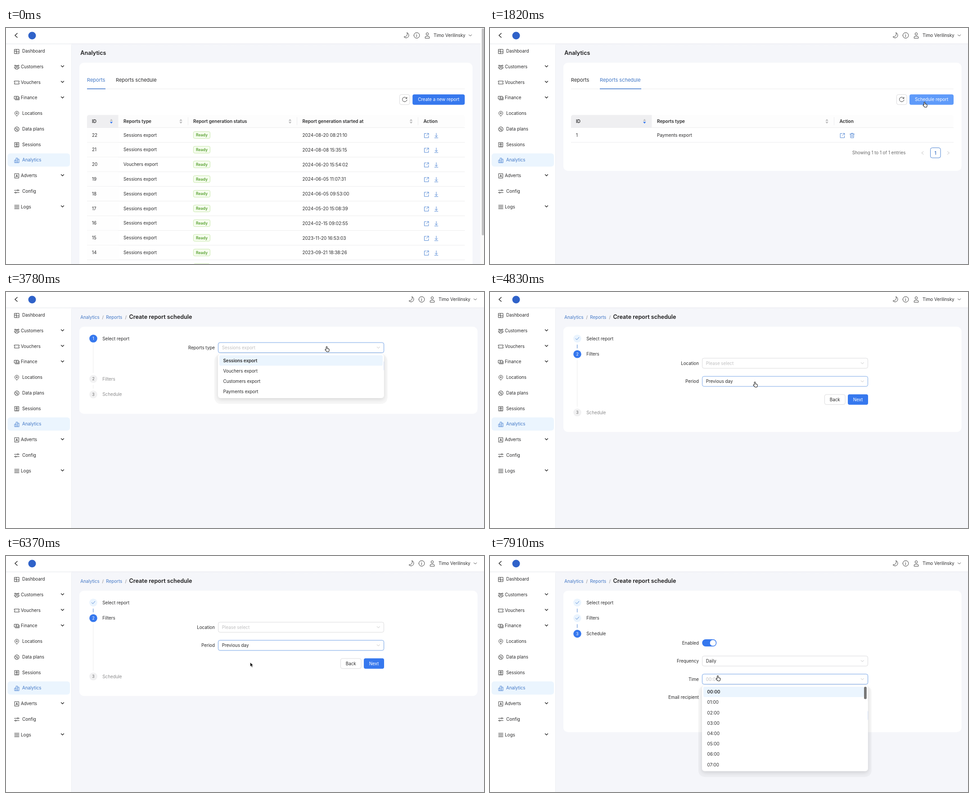
Animation of 1062x527 px, one loop 8 s. Source, as an HTML page:

```html
<!DOCTYPE html>
<html lang="en">
<head>
<meta charset="utf-8">
<title>Report schedule</title>
<style>
html, body { margin: 0; width: 100%; height: 100%; overflow: hidden; background: #f5f6fa; }
svg { display: block; width: 1062px; height: 527px; }
text { font: 9.8px Inter, "Noto Sans", sans-serif; fill: #2b2b2c; dominant-baseline: central; white-space: pre; }
.tab { font-size: 11px; }
.title { font-size: 12.6px; font-weight: 600; fill: #1c1c1d; }
.bold { font-weight: 600; }
.head { font-size: 10px; font-weight: 600; }
.date { font-size: 9.95px; }
.tag { font-size: 8.6px; font-weight: 600; fill: #57a02f; }
.num { font-size: 8.6px; text-anchor: middle; }
.end { text-anchor: end; }
.mid { text-anchor: middle; }
.blue { fill: #4177c6; }
.white { fill: #fff; }
.grey { fill: #8c8c8d; }
.pale { fill: #bfbfc0; }
.soft { fill: #666; }
.icon { fill: none; stroke: #333; stroke-width: .95; stroke-linejoin: round; stroke-linecap: round; }
.icon.link { stroke: #4a82d2; }
.icon.faint { stroke: #bdbdbe; }
.icon.dark { stroke: #222; stroke-width: 1.3; }
.line { stroke: #ececed; fill: none; }
.box { fill: #fff; stroke: #cdcdcf; stroke-width: .73; }
.primary { fill: #3678ee; }
.hover .primary { fill: #5f9bfa; }
.hover .box, .focus .box { stroke: #4a88dd; }
.hover .tab { fill: #4177c6; }
.ring { fill: none; stroke: #3678ee; stroke-opacity: 0; stroke-width: 1.5; }
.focus .ring { stroke-opacity: .06; }
.open .value { fill: #bfbfc0; }
.menu { transform-box: fill-box; transform-origin: 50% 0; }
.sheet { fill: #fff; filter: drop-shadow(0 3px 5px rgba(0,0,0,.13)); }
</style>
</head>
<body>
<svg id="stage" viewBox="0 0 1062 527"></svg>
<script>
const LOOP = 8000, STEP = 70;

const text = (x, y, s, cls = '') => `<text x="${x}" y="${y}" class="${cls}">${s}</text>`;
const rect = (x, y, w, h, r, attr) => `<rect x="${x}" y="${y}" width="${w}" height="${h}" rx="${r}" ${attr}/>`;
const fill = c => `fill="${c}"`;
const line = (x1, y1, x2, y2, attr = 'class="line"') => `<path d="M${x1} ${y1}L${x2} ${y2}" ${attr}/>`;
const icon = (x, y, d, cls = '') => `<path class="icon ${cls}" d="${d}" transform="translate(${x} ${y})"/>`;
const group = (id, body) => `<g id="${id}">${body}</g>`;
// Interactive area: carries its own hit box
const hot = (x, y, w, h, body, id = '') => `<g class="hot" id="${id}" data-box="${x},${y},${w},${h}">${body}</g>`;
const ring = (x, y, r) => `M${x - r} ${y}a${r} ${r} 0 1 0 ${2 * r} 0a${r} ${r} 0 1 0 ${-2 * r} 0`;

const ICONS = {
  dashboard: 'M-5-4.5h10v9.5h-10zM-1-4.5v9.5M-5-.5h4M-1 1h6',
  customers: ring(0, -2, 1.6) + ring(-3.6, -3, 1.3) + ring(3.6, -3, 1.3) + 'M-2.8 4.5v-1.5q0-2 2.8-2t2.8 2v1.5zM-3.2 2.5h-2.2v-1q0-1.8 2-1.8M3.2 2.5h2.2v-1q0-1.8-2-1.8',
  vouchers: 'M-5.3-3.3h10.6v2a1.4 1.4 0 0 0 0 2.8v2h-10.6v-2a1.4 1.4 0 0 0 0-2.8z',
  finance: 'M-5.3-4h9v6h-9zM-3.5 4h8.8v-6' + ring(-.8, -1, 1.5),
  locations: 'M0 5.3C-3 2.5-4.5 1-4.5-.8a4.5 4.5 0 0 1 9 0C4.5 1 3 2.5 0 5.3z' + ring(0, -.8, 1.5),
  plans: ring(0, 0, 5.2) + 'M-3.4 3.6l6.8-7' + ring(-1.8, -1.6, .9) + ring(1.8, 1.8, .9),
  sessions: 'M-4.5-5h9v10h-9zM-2.5 3.3h5' + ring(0, -1, 2.2) + ring(0, -1, .5),
  analytics: 'M-5 5v-5.5h3.3v5.5zM-1.7 5v-10h3.4v10zM1.7 5v-7.5h3.3v7.5z',
  adverts: 'M-4.5-5h9v10h-9zM-2 2.6l2-5.4l2 5.4M-1.3 1h2.6',
  config: 'M-5.3-2.5h6M4-2.5h1.3M-5.3 2.5h1.3M-1 2.5h6.3' + ring(2.4, -2.5, 1.5) + ring(-2.5, 2.5, 1.5),
  logs: 'M-5-4h10M-5-1.3h10M-5 1.4h10M-5 4h10',
  down: 'M-3-1.5l3 3l3-3',
  left: 'M2-3.2l-4 3.2l4 3.2',
  right: 'M-2-3.2l4 3.2l-4 3.2',
  check: 'M-3.6 0l2.5 2.7l4.8-5.4',
  moon: 'M1.6-6A6 6 0 1 1-5.3 3.2A6.6 6.6 0 0 0 1.6-6z',
  info: ring(0, 0, 6.3) + 'M0-.8v4M0-3v.2',
  user: ring(0, -3.2, 2.7) + 'M-4.8 6v-1.2q0-3 3-3h3.6q3 0 3 3v1.2z',
  reload: 'M4.6-2.8A5.2 5.2 0 1 0 5.2 .6M5-5.2v2.8h-2.8',
  open: 'M-.5-4.5h-4v9.5h9.3v-4M1.5-4.7h3.5v3.5M5-4.7l-4.8 4.8',
  download: 'M0-5v8M-2.7.4l2.7 2.8l2.7-2.8M-3.8 5.3h7.6',
  trash: 'M-5-3.2h10M-2-3.2v-1.8h4v1.8M-3.8-3.2l.5 8.4h6.6l.5-8.4M-1.2-.6v3.4M1.2-.6v3.4'
};

function sidebar() {
  const items = [['Dashboard', 'dashboard'], ['Customers', 'customers', 1], ['Vouchers', 'vouchers', 1],
    ['Finance', 'finance', 1], ['Locations', 'locations'], ['Data plans', 'plans'], ['Sessions', 'sessions'],
    ['Analytics', 'analytics'], ['Adverts', 'adverts', 1], ['Config', 'config'], ['Logs', 'logs', 1]];
  return rect(0, 34, 145, 493, 0, fill('#fff')) + line(145.5, 38, 145.5, 527, 'stroke="#eceef2"')
    + rect(3.5, 280, 138.5, 29.5, 6, fill('#ebf5fe'))
    + items.map(([label, name, nested], i) => {
      const y = 51.5 + 34.75 * i, active = name === 'analytics';
      return icon(24, y + .7, ICONS[name], active ? 'link' : '')
        + text(nested ? 33 : 36, y, label, active ? 'blue' : '')
        + (nested ? icon(125.5, y - .8, ICONS.down, 'dark') : '');
    }).join('');
}

function header() {
  const user = icon(900.5, 16.5, ICONS.moon) + icon(923.5, 16.5, ICONS.info) + icon(947, 16.5, ICONS.user)
    + text(961, 16.5, 'Timo Verilinsky') + icon(1042.5, 16.5, ICONS.down);
  return rect(0, 34, 1062, 4, 0, 'fill="url(#shade)"') + rect(0, 0, 1062, 34.5, 0, fill('#fff'))
    + '<path d="M25.5 11.5l-5.5 5l5.5 5" fill="none" stroke="#222" stroke-width="1.4"/>'
    + '<circle cx="58" cy="17" r="8.5" fill="#2f62c9"/>' + group('user', user);
}

const card = (right, bottom) => rect(163, 77.5, right - 163, bottom - 77.5, 10, fill('#fff'));
const sorter = (x, sorted) => `<path d="M${x - 3.2} 207.3l3.2-4l3.2 4z" fill="#b9b9ba"/>`
  + `<path d="M${x - 3.2} 209.5l3.2 4l3.2-4z" fill="${sorted ? '#3678ee' : '#b9b9ba'}"/>`;
const button = (x, y, w, label, primary) => hot(x, y, w, 23.2, primary
  ? rect(x, y, w, 23.2, 4, 'class="primary"') + text(x + w / 2, y + 11.6, label, 'white mid')
  : rect(x + .4, y + .4, w - .8, 22.4, 4, 'class="box"') + text(x + w / 2, y + 11.6, label, 'mid'));
const reload = x => hot(x, 148.2, 23.4, 23.2, rect(x + .4, 148.6, 22.6, 22.4, 4, 'class="box"')
  + icon(x + 11.7, 159.8, ICONS.reload));
const tabs = (active, right) => line(180, 136, right, 136)
  + hot(180, 104, 41, 32, text(180, 116.3, 'Reports', 'tab' + (active ? '' : ' blue')))
  + hot(244, 104, 92, 32, text(244, 116.3, 'Reports schedule', 'tab' + (active ? ' blue' : '')));

// Columns: [label, text x, sorter x, separator x]
function tableHead(idRight, right, columns) {
  return rect(180, 194.2, right - 180, 28, 5, fill('#fdfdfd'))
    + `<path d="M180 222.2v-23q0-5 5-5H${idRight}v28z" fill="#efeff1"/>`
    + columns.map(([label, x, sort, bar], i) => text(x, 208.3, label, 'head')
      + (sort ? sorter(sort, !i) : '') + (bar ? line(bar, 199, bar, 217) : '')).join('')
    + line(180, 222.4, right, 222.4);
}

function reportsPage() {
  const dates = ['2024-08-20 08:21:10', '2024-08-08 15:35:15', '2024-06-20 15:54:02', '2024-06-05 11:07:31',
    '2024-06-05 09:53:00', '2024-05-20 15:08:39', '2024-02-15 09:02:55', '2023-11-20 16:53:03',
    '2023-09-21 18:38:26', '2023-09-14 10:12:41'];
  const rows = dates.map((date, i) => {
    const y = 239 + 32.8 * i;
    return rect(180, y - 16, 69.5, 32, 0, fill('#fefefe'))
      + text(191, y, 22 - i) + text(261, y, i === 2 ? 'Vouchers export' : 'Sessions export')
      + rect(416.4, y - 7.6, 37, 15.2, 3, 'fill="#f6fdef" stroke="#b5e08f" stroke-width=".73"')
      + text(435, y + .2, 'Ready', 'tag mid') + text(658.5, y, date, 'date')
      + icon(934, y + 1, ICONS.open, 'link') + icon(956, y + 1, ICONS.download, 'link')
      + line(180, y + 16.4, 1019.5, y + 16.4);
  }).join('');
  return text(165.3, 55.7, 'Analytics', 'title') + card(1036.5, 560) + tabs(0, 1019.5)
    + reload(874) + button(903.2, 148.2, 116, 'Create a new report', true)
    + tableHead(249.5, 1019.5, [['ID', 191, 234], ['Reports type', 261, 388.5, 404.5],
      ['Report generation status', 416, 631, 646.5], ['Report generation started at', 658.5, 900, 915.5],
      ['Action', 927.5]])
    + rows + rect(1054, 0, 8, 527, 0, fill('#fafafa')) + rect(1057, 1, 5, 462, 2.5, fill('#c1c1c3'));
}

function schedulePage() {
  return text(165.3, 55.7, 'Analytics', 'title') + card(1047.5, 319) + tabs(1, 1030)
    + reload(903) + button(932, 148.2, 98, 'Schedule report', true)
    + tableHead(359.5, 1030, [['ID', 191, 343.3], ['Reports type', 371, 748.5, 764.5], ['Action', 776.5]])
    + text(191, 239, '1') + text(371, 239, 'Payments export')
    + icon(782.7, 240, ICONS.open, 'link') + icon(804.5, 240, ICONS.trash, 'link') + line(180, 255.3, 1030, 255.3)
    + text(804.7, 278.5, 'Showing 1 to 1 of 1 entries', 'soft')
    + icon(961, 279, ICONS.left, 'faint') + icon(1018.5, 279, ICONS.right, 'faint')
    + rect(978.5, 267.5, 22.5, 22.5, 4, 'fill="#fff" stroke="#4a82d2"') + text(989.7, 279, '1', 'bold blue mid');
}

function steps(current, ys) {
  return ['Select report', 'Filters', 'Schedule'].map((label, i) => {
    const y = ys[i], done = i < current, active = i === current;
    const disc = done ? '#eaf4fe' : active ? '#3678ee' : '#f1f1f2';
    return `<circle cx="194" cy="${y}" r="8.8" fill="${disc}"/>`
      + (done ? icon(194, y, ICONS.check, 'link') : text(194, y + .2, i + 1, 'num ' + (active ? 'white' : 'soft')))
      + text(214.3, y, label, active || done ? '' : 'grey')
      + (i < 2 ? line(193.8, y + 13.5, 193.8, ys[i + 1] - 13, done ? 'stroke="#4a82d2"' : 'class="line"') : '');
  }).join('');
}

const select = (id, y, label, value, pale) => text(464, y, label, 'end')
  + hot(471.5, y - 11.5, 368, 23, rect(470.5, y - 12.3, 370, 24.6, 5, 'class="ring"')
    + rect(471.6, y - 11.2, 367.9, 22.5, 4, 'class="box"') + text(479.8, y + .1, value, 'value ' + (pale ? 'pale' : ''))
    + icon(827.3, y, ICONS.down, 'faint'), id);

function menu(id, y, options, scrolls) {
  const top = y + 14, h = options.length * 23.2 + 5.8;
  return `<g id="${id}" class="menu">` + rect(463, top + 1, 384.5, h + 12, 14, 'fill="#000" fill-opacity=".03"')
    + rect(471, top, 368.8, h, 6, 'class="sheet"')
    + rect(474, top + 2.9, scrolls ? 357 : 363, 23.2, 3, fill('#ebf5fe'))
    + options.map((o, i) => text(482.5, top + 14.6 + 23.2 * i, o, i ? '' : 'bold')).join('')
    + (scrolls ? rect(831, top + 3, 5.8, 27.5, 2.5, fill('#777')) : '') + '</g>';
}

const crumbs = text(165.3, 56.3, 'Analytics', 'blue') + text(213.5, 56.3, '/', 'grey')
  + text(222.3, 56.3, 'Reports', 'blue') + text(264.5, 56.3, '/', 'grey')
  + text(273.5, 55.7, 'Create report schedule', 'title');

const formPage = (step, bottom, ys, body) => crumbs + card(1047.5, bottom) + steps(step, ys) + body;
const hours = Array.from({ length: 8 }, (_, i) => `0${i}:00`);

const pages = [
  reportsPage(),
  schedulePage(),
  formPage(0, 272, [104, 194, 228.7], select('type', 124.2, 'Reports type', 'Sessions export')
    + button(795, 153.2, 45, 'Next', true)
    + menu('typeMenu', 124.4, ['Sessions export', 'Vouchers export', 'Customers export', 'Payments export'])),
  formPage(1, 312.5, [104, 138.8, 269], select('location', 159, 'Location', 'Please select', true)
    + select('period', 199.5, 'Period', 'Previous day')
    + button(743, 228.5, 46.5, 'Back') + button(795, 228.5, 45, 'Next', true)
    + menu('periodMenu', 199.5, ['Previous day', 'Previous week', 'Previous month'])),
  formPage(2, 393.3, [104, 138.8, 173.6], text(464, 194, 'Enabled', 'end')
    + rect(471.3, 186, 32, 16, 8, fill('#3678ee')) + '<circle cx="495.3" cy="194" r="6.6" fill="#fff"/>'
    + select('frequency', 234.5, 'Frequency', 'Daily') + select('time', 275, 'Time', '00:00')
    + text(464, 315.5, 'Email recipient', 'end') + rect(471.6, 304.3, 367.9, 22.5, 4, 'class="box"')
    + button(743, 344.5, 46.5, 'Back') + button(795, 344.5, 45, 'Save', true)
    + menu('timeMenu', 275, hours, true))
];

const stage = document.getElementById('stage');
stage.innerHTML = '<defs><linearGradient id="shade" x2="0" y2="1"><stop stop-color="#e6e8ec"/>'
  + '<stop offset="1" stop-color="#f3f4f8" stop-opacity="0"/></linearGradient></defs>'
  + rect(0, 0, 1062, 527, 0, fill('#f5f6fa')) + sidebar() + header()
  + pages.map((body, i) => group('page' + i, body)).join('')
  + rect(0, 135, 1, 1.5, 0, 'id="ink" fill="#3c74cc"')
  + group('cursor', '<path id="arrow" d="M0 0v9.6l2.2-2l1.5 3.4l1.8-.8l-1.5-3.3h3z" fill="#111" stroke="#fff" stroke-width=".7"/>'
    + '<path id="hand" transform="translate(.6 .4)" d="M-1.3 6V1a1.2 1.2 0 0 1 2.4 0v3.2l3.3.8c.9.3 1.3.9 1.2 1.8l-.7 3.6q-.2 1.2-1.5 1.2H1q-.8 0-1.4-.8L-3.4 7.5c-.5-1 .7-1.9 1.4-1.2z" fill="#fff" stroke="#222" stroke-width="1.1"/>');

const $ = id => document.getElementById(id);
const pageStart = [0, 1120, 2100, 4270, 6930];
// Menus: [select, opens, closes, loses focus]
const menus = [['type', 3430, 3920, 4270], ['period', 5530, 6160, 6930], ['time', 7690, LOOP + 300, LOOP]];
const path = [[420, 520, 300], [980, 292, 120], [1200, 292, 120], [1750, 965, 165], [2030, 965, 165],
  [2520, 187, 197], [2730, 187, 197], [2870, 628, 143], [3080, 700, 125], [3220, 700, 125], [3600, 712, 121.5],
  [3780, 712, 121.5], [3920, 690, 152], [4200, 817, 166], [4340, 817, 166], [4830, 588, 200.5], [5040, 600, 165],
  [5180, 600, 165], [5320, 575, 203], [5530, 575, 203], [5880, 550, 229], [6090, 542.5, 237.5],
  [6440, 542.5, 237.5], [6720, 812, 241], [7000, 812, 241], [7560, 505.5, 267], [LOOP, 505.5, 267]];
const hots = [...document.querySelectorAll('.hot')].map(el => ({
  el, page: +el.closest('[id^=page]').id.slice(4), box: el.dataset.box.split(',').map(Number)
}));

const clamp = v => Math.min(1, Math.max(0, v));
const ease = k => k * k * (3 - 2 * k);
const mix = (a, b, k) => a + (b - a) * k;

function cursorAt(t) {
  const i = Math.max(1, path.findIndex(p => p[0] >= t));
  const [a, b] = [path[i - 1], path[i]], k = ease(clamp((t - a[0]) / (b[0] - a[0])));
  return [mix(a[1], b[1], k), mix(a[2], b[2], k)];
}

function draw(t) {
  const page = pageStart.filter(s => s <= t).length - 1;
  pages.forEach((_, i) => $('page' + i).style.display = i === page ? '' : 'none');
  $('user').setAttribute('transform', `translate(${page ? 0 : -11} 0)`);

  const slide = ease(clamp((t - pageStart[1]) / 280)), ink = $('ink');
  ink.style.display = page < 2 ? '' : 'none';
  ink.setAttribute('x', mix(180, 244, slide));
  ink.setAttribute('width', mix(41, 92, slide));

  let menuOpen = false;
  for (const [id, from, to, blur] of menus) {
    const shown = ease(clamp((t - from) / 200)) * (1 - ease(clamp((t - to) / 200)));
    const el = $(id + 'Menu');
    el.style.display = shown ? '' : 'none';
    el.style.opacity = shown;
    el.style.transform = `scaleY(${mix(.8, 1, shown)})`;
    $(id).classList.toggle('focus', t >= from && t < blur);
    $(id).classList.toggle('open', t >= from && t < to);
    menuOpen ||= t >= from && t < to;
  }

  const [x, y] = cursorAt(t);
  let pointing = false;
  for (const { el, page: owner, box: [bx, by, w, h] } of hots) {
    const inside = t >= path[0][0] && owner === page && x >= bx && x <= bx + w && y >= by && y <= by + h;
    el.classList.toggle('hover', inside);
    pointing ||= inside;
  }
  pointing ||= menuOpen;
  $('cursor').setAttribute('transform', `translate(${x} ${y})`);
  $('cursor').style.display = t < path[0][0] ? 'none' : '';
  $('hand').style.display = pointing ? '' : 'none';
  $('arrow').style.display = pointing ? 'none' : '';
}

const start = performance.now();
function tick() {
  const t = (performance.now() - start) % LOOP;
  draw(Math.min(Math.floor(t / STEP) * STEP, 7910));
  requestAnimationFrame(tick);
}
tick();
</script>
</body>
</html>
```
